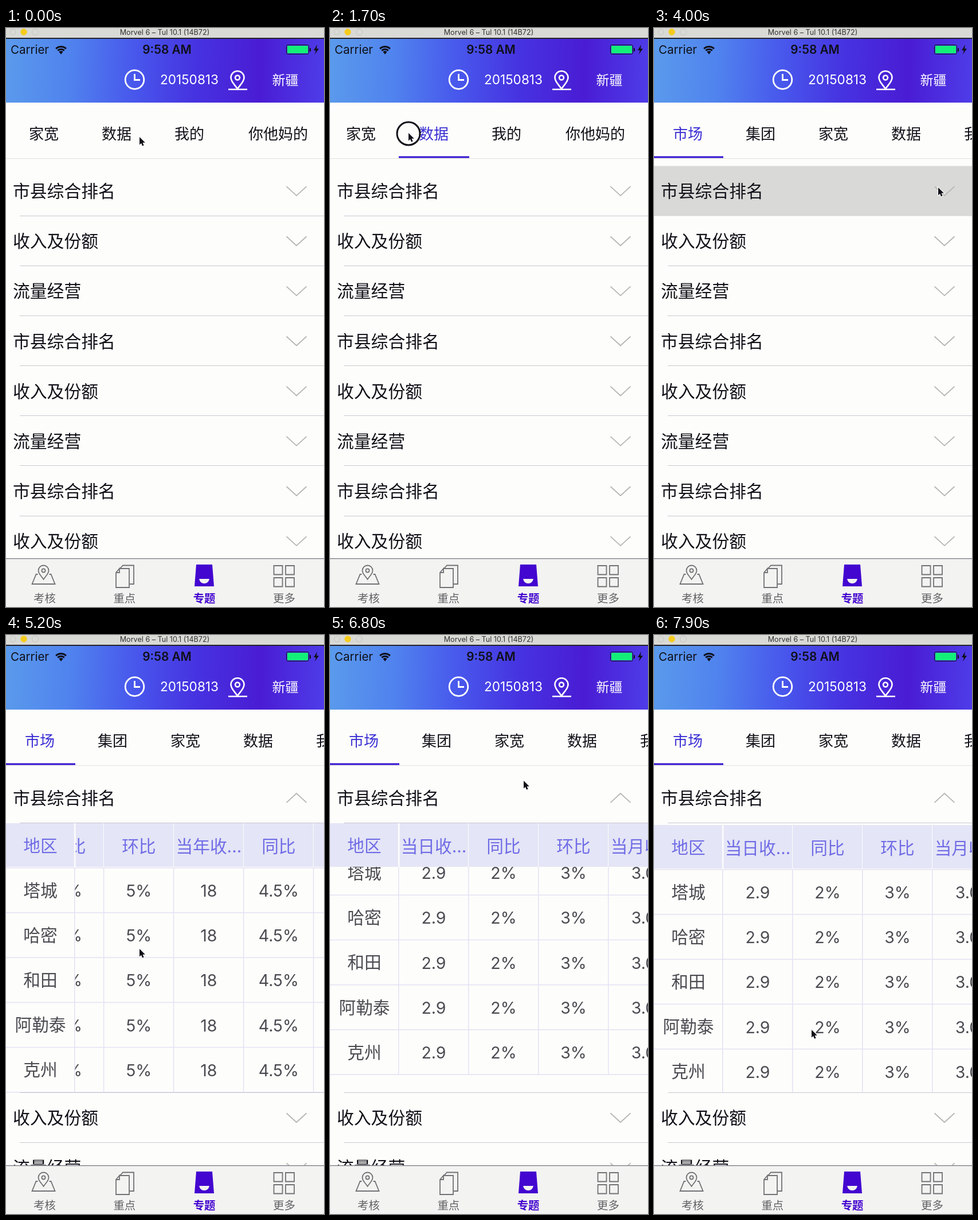
An HTML page with a canvas that plays this animation: 555 by 1009 pixels, repeating every 8000 ms.

```html
<!DOCTYPE html>
<html lang="zh-CN">
<head>
<meta charset="utf-8">
<title>Ranking list</title>
<style>
html, body { margin: 0; width: 100%; height: 100%; overflow: hidden; background: #fdfdfb; }
canvas { display: block; width: 555px; height: 1009px; }
</style>
</head>
<body>
<canvas id="stage" width="555" height="1009"></canvas>
<script>
const W = 555, H = 1009, LOOP = 8000, STEP = 100;
const c = document.getElementById('stage').getContext('2d');
const FONT = 'Inter, "Noto Sans CJK SC", "Noto Sans CJK", sans-serif';
const INDIGO = '#4305d0', PAPER = '#fdfdfb', INK = '#101018', GRAY = '#727276', WHITE = '#fff';
const RULE = '#e5e1f4', DIVIDER = '#c8c8d4';

const TABS = ['市场', '集团', '家宽', '数据', '我的', '你他妈的'];
const ROWS = ['市县综合排名', '收入及份额', '流量经营'];
const AREAS = ['塔城', '哈密', '和田', '阿勒泰', '克州'];
const COLS = ['日 2.9 2% 3%', '月 3.0 4% 5%', '年 18 4.5% 6%'].flatMap(group => {
  const [span, income, year, month] = group.split(' ');
  return [[`当${span}收...`, income], ['同比', year], ['环比', month]];
});
const TAB_W = 127, ROW_H = 87.15, LIST_Y = 240.5, TABLE_Y = 328, TABLE_H = 470;
const COL_W = 122, COL_X = 120, CELL_H = 78.2, HEAD_H = 76;

// Pointer legs: each leaves at `at` and takes MOVE ms
const MOVE = 350;
const LEGS = [
  { at: -MOVE, x: 233, y: 190 },
  { at: 700, x: 137, y: 183 },
  { at: 1850, x: 400, y: 186, drag: true },
  { at: 2500, x: 60, y: 184 },
  { at: 3300, x: 496, y: 278 },
  { at: 4250, x: 470, y: 530 },
  { at: 4700, x: 233, y: 547, drag: true },
  { at: 5450, x: 470, y: 600, drag: true },
  { at: 5800, x: 333, y: 672 },
  { at: 6150, x: 338, y: 254, drag: true },
  { at: 6960, x: 275, y: 688, drag: true }
];
const CLICKS = [1550, 2900, 3750], CLICK = 200;
const [TAP_DATA, TAP_MARKET, TAP_ROW] = CLICKS;
const [SWIPE_TABS, SWIPE_LEFT, SWIPE_RIGHT, PULL_UP, PULL_DOWN] = LEGS.filter(l => l.drag).map(l => l.at);

const within = (t, start, span) => t >= start && t < start + span;

function ramp(t, start, span) {
  const p = Math.min(1, Math.max(0, (t - start) / span));
  return p * p * (3 - 2 * p);
}

function pointer(t) {
  let { x, y } = LEGS[0];
  for (const leg of LEGS) {
    const p = ramp(t, leg.at, MOVE);
    x += (leg.x - x) * p;
    y += (leg.y - y) * p;
  }
  return { x, y };
}

// Rubber band while dragging, critically damped spring after release
function pull(t, start) {
  if (t < start) return 0;
  const end = start + MOVE;
  const d = Math.abs(pointer(Math.min(t, end)).y - pointer(start).y);
  const w = Math.max(0, t - end) / 100;
  return TABLE_H * (1 - 1 / (d * 0.55 / TABLE_H + 1)) * (1 + w) * Math.exp(-w);
}

const tabScroll = t => 247 + 12 * ramp(t, 0, 300) - 259 * ramp(t, SWIPE_TABS, 650);
const tabMark = t => 59.5 + 3 * TAB_W * (ramp(t, TAP_DATA - 100, 200) - ramp(t, TAP_MARKET, 250));
const tableScroll = t => 663 * (ramp(t, SWIPE_LEFT, 667) - ramp(t, SWIPE_RIGHT, 550));

function text(s, x, y, size, color, align = 'center', weight = 400) {
  c.font = `${weight} ${size}px ${FONT}`;
  c.textAlign = align;
  c.fillStyle = color;
  c.fillText(s, x, y + size * (/[^\x00-\u2fff]/.test(s) ? 0.38 : 0.364));
}

function rect(x, y, w, h, color) {
  c.fillStyle = color;
  c.fillRect(x, y, w, h);
}

// Fills the path, or strokes it when a width is given
function shape(d, x, y, color, width) {
  c.save();
  c.translate(x, y);
  c.fillStyle = c.strokeStyle = color;
  c.lineWidth = width;
  if (width) c.stroke(new Path2D(d));
  else c.fill(new Path2D(d));
  c.restore();
}

function arc(x, y, r, color, width, from = 0, to = 7) {
  c.beginPath();
  c.arc(x, y, r, from, to);
  c.fillStyle = c.strokeStyle = color;
  c.lineWidth = width;
  if (width) c.stroke();
  else c.fill();
}

function clipped(x, y, w, h, draw) {
  c.save();
  c.beginPath();
  c.rect(x, y, w, h);
  c.clip();
  draw();
  c.restore();
}

function pin(x, y, r, color, width) {
  const k = r * 0.95;
  shape(`M0 ${r * 1.7}C${-k * 0.5} ${r} ${-r} ${r * 0.6} ${-r} 0A${r} ${r} 0 0 1 ${r} 0C${r} ${r * 0.6} ${k * 0.5} ${r} 0 ${r * 1.7}z`, x, y, color, width);
  arc(x, y, r * 0.34, color, width);
}

function drawTitleBar() {
  rect(0, 0, W, 18, '#d9d9d6');
  rect(0, 17, W, 2, '#25252d');
  arc(12, 7, 5, '#c4c4c0', 1);
  arc(31, 7, 5.7, '#f5cc1c');
  arc(51, 7, 5.5, '#c4c4c0', 1);
  text('Morvel 6 – Tul 10.1 (14B72)', 277, 7.5, 12.6, '#303030');
}

function drawHeader() {
  const g = c.createLinearGradient(0, 60, W, 80);
  ['#5a9aec', '#5083ee', '#4858ec', '#4632e0', '#4a1cd4', '#4e3ce8'].forEach((color, i) => g.addColorStop(i / 5, color));
  rect(0, 19, W, 111, g);

  text('Carrier', 8, 37.5, 20.5, INK, 'left');
  for (const r of [3.5, 8, 12.5]) arc(96, 45, r, INK, 3, -Math.PI * 0.75, -Math.PI * 0.25);
  shape('M0 0l-3-4h6z', 96, 46, INK);
  text('9:58 AM', 281, 37.5, 20.8, INK, 'center', 600);

  c.beginPath();
  c.roundRect(489.5, 29.5, 39, 16, 3);
  c.strokeStyle = INK;
  c.lineWidth = 1;
  c.stroke();
  rect(491, 31, 36, 13, '#13ef78');
  rect(530, 35, 2, 6, INK);
  shape('M1 -9l-6 10h4l-2 7 7-10h-4z', 542, 38, INK);

  arc(224.5, 90, 16.3, WHITE, 2.8);
  shape('M0 -10v10.5h9.5', 224.5, 90, WHITE, 2.8);
  text('20150813', 320, 90, 22.6, WHITE);
  pin(404, 86.5, 11.5, WHITE, 2.6);
  shape('M-16 0h33', 404, 107, WHITE, 2.4);
  text('新疆', 487.5, 90, 23, WHITE, 'center', 500);
}

function drawTabs(t) {
  const scroll = tabScroll(t), mark = tabMark(t);
  rect(0, 130, W, 98, PAPER);
  rect(0, 227, W, 1, '#e4e4dc');
  TABS.forEach((name, i) => {
    const x = 59 + TAB_W * i + (name.length - 2) * 14;
    text(name, x - scroll, 184.5, 26, Math.abs(mark - x) < 40 ? '#3a2fd2' : INK);
  });
  rect(mark - 61.5 - scroll, 223.5, 123, 3, '#3311cf');
}

function drawTable(t) {
  const up = t < PULL_DOWN ? pull(t, PULL_UP) : 0;
  const top = TABLE_Y + pull(t, PULL_DOWN), body = top + 78 - up, headEnd = top + HEAD_H;
  const belowHead = draw => clipped(0, headEnd, W, H, draw);

  const column = (x, w, title, value) => {
    const mid = x + w / 2, dy = value ? 0.5 : -0.7;
    belowHead(() => {
      AREAS.forEach((area, i) => text(value || area, mid, body + CELL_H * (i + 0.5) + dy, value ? 28.5 : 29.7, '#4b4b52'));
      rect(x + w - 1, body, 1.5, CELL_H * 5, RULE);
    });
    rect(x, top, w, HEAD_H, '#e4e5f6');
    rect(x + w - 1, top, 2.5, HEAD_H, PAPER);
    text(title, mid, top + 39 + dy, 29.7, '#706ce6');
  };

  clipped(COL_X, TABLE_Y, W, TABLE_H, () =>
    COLS.forEach(([title, value], i) => column(COL_X + i * COL_W - tableScroll(t), COL_W, title, value)));
  column(0, COL_X, '地区');
  belowHead(() => {
    for (let i = 0; i <= 5; i++) rect(0, body + CELL_H * i - 1, W, 1.5, RULE);
  });
}

function drawList(t) {
  const shift = TABLE_H * ramp(t, TAP_ROW + 300, 350);
  const lit = within(t, TAP_ROW + 100, 250);
  rect(0, 228, W, 700, PAPER);
  if (lit) rect(0, LIST_Y, W, ROW_H, '#d9d9d7');
  if (shift) clipped(0, TABLE_Y, W, shift, () => drawTable(t));
  for (let i = 0; i < 8; i++) {
    const y = LIST_Y + ROW_H * (i + 0.5) + (i ? shift : 0);
    const dip = i === 0 && shift ? -8 : 8;
    text(ROWS[i % 3], 12, y - 0.3, 29.8, INK, 'left');
    shape(`M-17.5 ${-dip}L0 ${dip}L17.5 ${-dip}`, 507, y, '#b6b6b2', 1.8);
    if (i || !lit) rect(24, Math.round(y + ROW_H / 2 - 1), W, 1, DIVIDER);
  }
  if (shift) rect(24, TABLE_Y + shift - 1, W, 1, DIVIDER);
}

function drawTabBar() {
  rect(0, 924, W, 85, '#f3f3f1');
  rect(0, 924, W, 1.3, '#7c7c86');

  shape('M-10 0h-3l-7 17h40l-7 -17h-3', 65.5, 952, GRAY, 1.8);
  pin(65.5, 945.5, 9, GRAY, 1.8);
  shape('M6 0h17v33h-23v-26l6 -7v7h-6M7 0l5 -5.5h19v32.5h-7', 192, 942, GRAY, 1.8);
  shape('M-14 0h28l3 38h-34z', 346, 935, INDIGO);
  shape('M-13 0h26h-4q-2 8 -9 8t-9 -8z', 346, 960, '#f3f3f1');
  for (const x of [467.5, 488]) for (const y of [937, 958]) shape('M0 0h15v15.5h-15z', x, y, GRAY, 1.8);

  ['考核', '重点', '专题', '更多'].forEach((label, i) => {
    const on = i === 2;
    text(label, 67.5 + i * 139.3, 994, 19.4, on ? INDIGO : '#626266', 'center', on ? 700 : 500);
  });
}

function drawPointer(t) {
  const { x, y } = pointer(t);
  const pressed = CLICKS.some(at => within(t, at, CLICK)) || LEGS.some(l => l.drag && within(t, l.at, MOVE));
  if (pressed) arc(x, y + 1, 20, INK, 3);
  const arrow = 'M0 0v13.5l3 -2.7 2 4.7 2.6 -1.1 -2 -4.6h4.2z';
  shape(arrow, x, y, WHITE, 2);
  shape(arrow, x, y, INK);
}

function frame(now) {
  const t = Math.floor((now % LOOP) / STEP) * STEP;
  drawList(t);
  drawTabs(t);
  drawTitleBar();
  drawHeader();
  drawTabBar();
  drawPointer(t);
}

let start;
function tick(now) {
  start ??= now;
  frame(now - start);
  requestAnimationFrame(tick);
}
frame(0);
requestAnimationFrame(tick);
</script>
</body>
</html>
```
